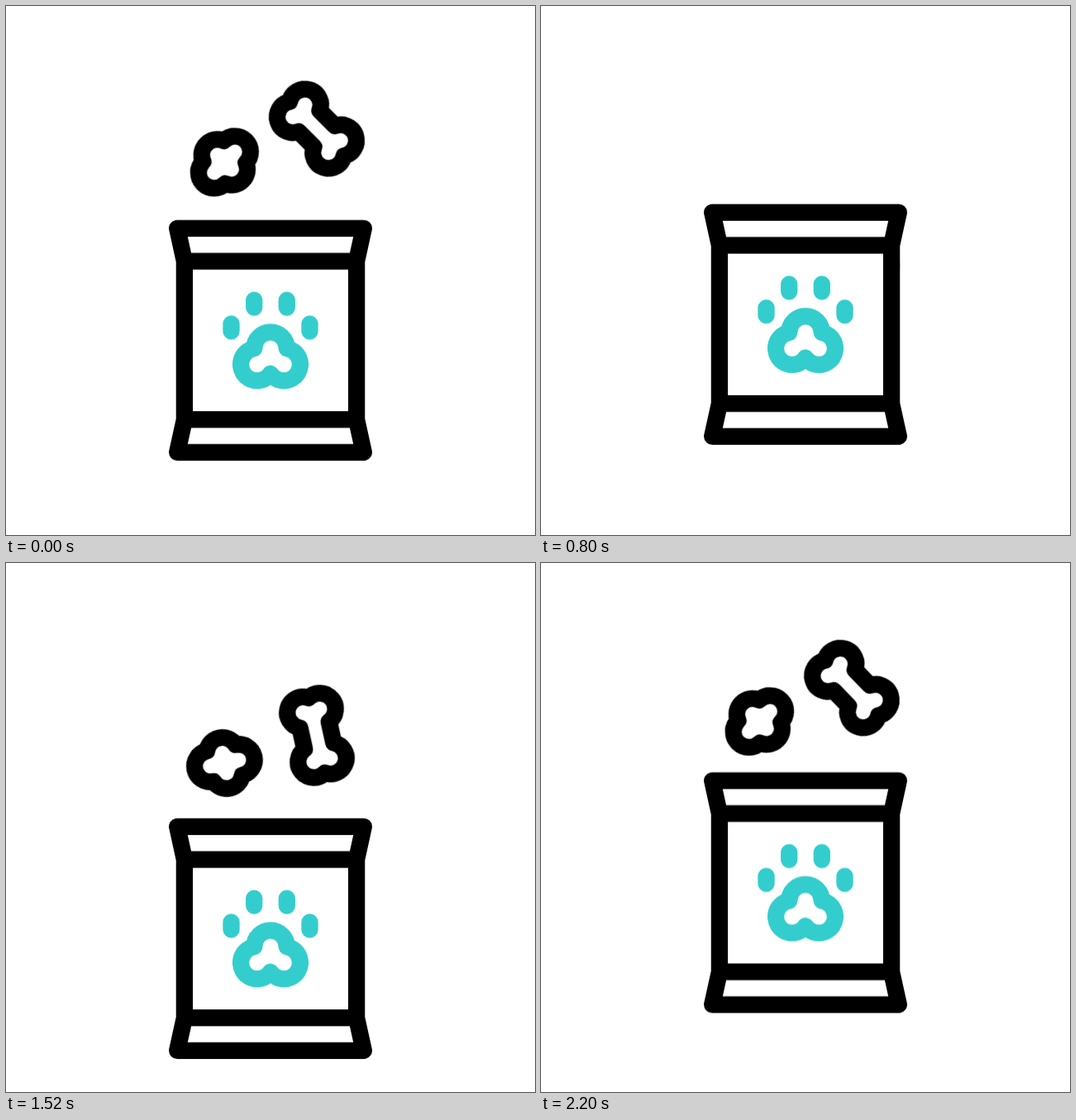
These frames come from a looping animation (640x640 px, 2240 ms). An HTML page without scripts:

```html
<!DOCTYPE html>
<html lang="en">
<head>
<meta charset="utf-8">
<title>Pet treats</title>
<style>
  html, body { margin: 0; width: 100%; height: 100%; overflow: hidden; background: #fff; }
  svg { display: block; width: 100%; height: 100%; }
  path { stroke-width: 20.3; stroke-linejoin: round; stroke-linecap: round; }
  .ink { stroke: #000; fill: #fff; }
  .paw { stroke: #33cdcd; fill: none; }

  .bag, .bone, .kibble, .spin { animation: 2240ms linear infinite; }
  .bag { animation-name: bag; }
  .bone { animation-name: bone; }
  .kibble { animation-name: kibble; }
  .spin { animation-name: spin; }

  /* dips to catch, rises to toss, twice per loop */
  @keyframes bag {
    0% { transform: translateY(0); animation-timing-function: cubic-bezier(.333, .26, .667, 1); }
    19.29% { transform: translateY(86.5px); }
    20.54% { transform: translateY(86.5px); animation-timing-function: cubic-bezier(.333, 0, .667, 1); }
    36.61% { transform: translateY(-20px); }
    44.55% { transform: translateY(-20px); animation-timing-function: cubic-bezier(.333, 0, .667, 1); }
    61.88% { transform: translateY(63px); }
    63.21% { transform: translateY(63px); animation-timing-function: cubic-bezier(.333, 0, .667, 1); }
    82.01% { transform: translateY(-20px); }
    88.39% { transform: translateY(-20px); animation-timing-function: cubic-bezier(.333, 0, .667, .333); }
    100% { transform: translateY(0); }
  }
  /* treats fall and fly with constant gravity */
  @keyframes bone {
    0% { transform: translate(376px, 148.5px); animation-timing-function: cubic-bezier(.333, 0, .667, .333); }
    20.54% { transform: translate(376px, 475px); }
    35.714% { transform: translate(376px, 330px); animation-timing-function: cubic-bezier(.333, .667, .667, 1); }
    53.571% { transform: translate(376px, 111px); }
    57.143% { transform: translate(376px, 111px); animation-timing-function: cubic-bezier(.333, 0, .667, .333); }
    75% { transform: translate(376px, 380px); }
    82.143% { transform: translate(376px, 430px); animation-timing-function: cubic-bezier(.333, .667, .667, 1); }
    100% { transform: translate(376px, 148.5px); }
  }
  @keyframes kibble {
    0% { transform: translate(264.4px, 189px); animation-timing-function: cubic-bezier(.333, 0, .667, .333); }
    20.54% { transform: translate(264.4px, 515px); }
    39.286% { transform: translate(264.4px, 356px); animation-timing-function: cubic-bezier(.333, .667, .667, 1); }
    57.143% { transform: translate(264.4px, 155px); animation-timing-function: cubic-bezier(.333, 0, .667, .333); }
    75% { transform: translate(264.4px, 395px); }
    82.143% { transform: translate(264.4px, 479px); animation-timing-function: cubic-bezier(.333, .667, .667, 1); }
    100% { transform: translate(264.4px, 189px); }
  }
  @keyframes spin {
    0%, 57.143% { transform: rotate(0deg); animation-timing-function: cubic-bezier(.333, 0, .667, .333); }
    17.857%, 75% { transform: rotate(90deg); }
    35.714%, 82.143% { transform: rotate(90deg); animation-timing-function: cubic-bezier(.333, .667, .667, 1); }
    53.571%, 100% { transform: rotate(0deg); }
  }
</style>
</head>
<body>
<svg viewBox="0 0 640 640">
  <g class="ink">
    <g class="kibble"><g class="spin">
      <path transform="rotate(-45)" d="M17.7-19A19 19 0 0 1 17.7 19A19 19 0 0 1-17.7 19A19 19 0 0 1-17.7-19A19 19 0 0 1 17.7-19Z"/>
    </g></g>
    <g class="bone"><g class="spin">
      <path transform="rotate(45)" d="M-13.1-18H13.1A19 19 0 1 1 46.4 0A19 19 0 1 1 13.1 18H-13.1A19 19 0 1 1-46.4 0A19 19 0 1 1-13.1-18Z"/>
    </g></g>
  </g>
  <g class="bag">
    <path class="ink" d="M207.2 268.8H432.8L424.1 308.6V500.2L432.8 539.8H207.2L215.9 500.2V308.6ZM215.9 308.6H424.1M215.9 500.2H424.1"/>
    <g class="paw">
      <path d="M300.2 355.6v9M339.8 355.6v9M272.5 384.4v9M367.5 384.4v9"/>
      <path d="M300.3 414.1A19.7 19.7 0 1 1 339.7 414.1A19.7 19.7 0 1 1 320 444.7A19.7 19.7 0 1 1 300.3 414.1Z"/>
    </g>
  </g>
</svg>
</body>
</html>
```
